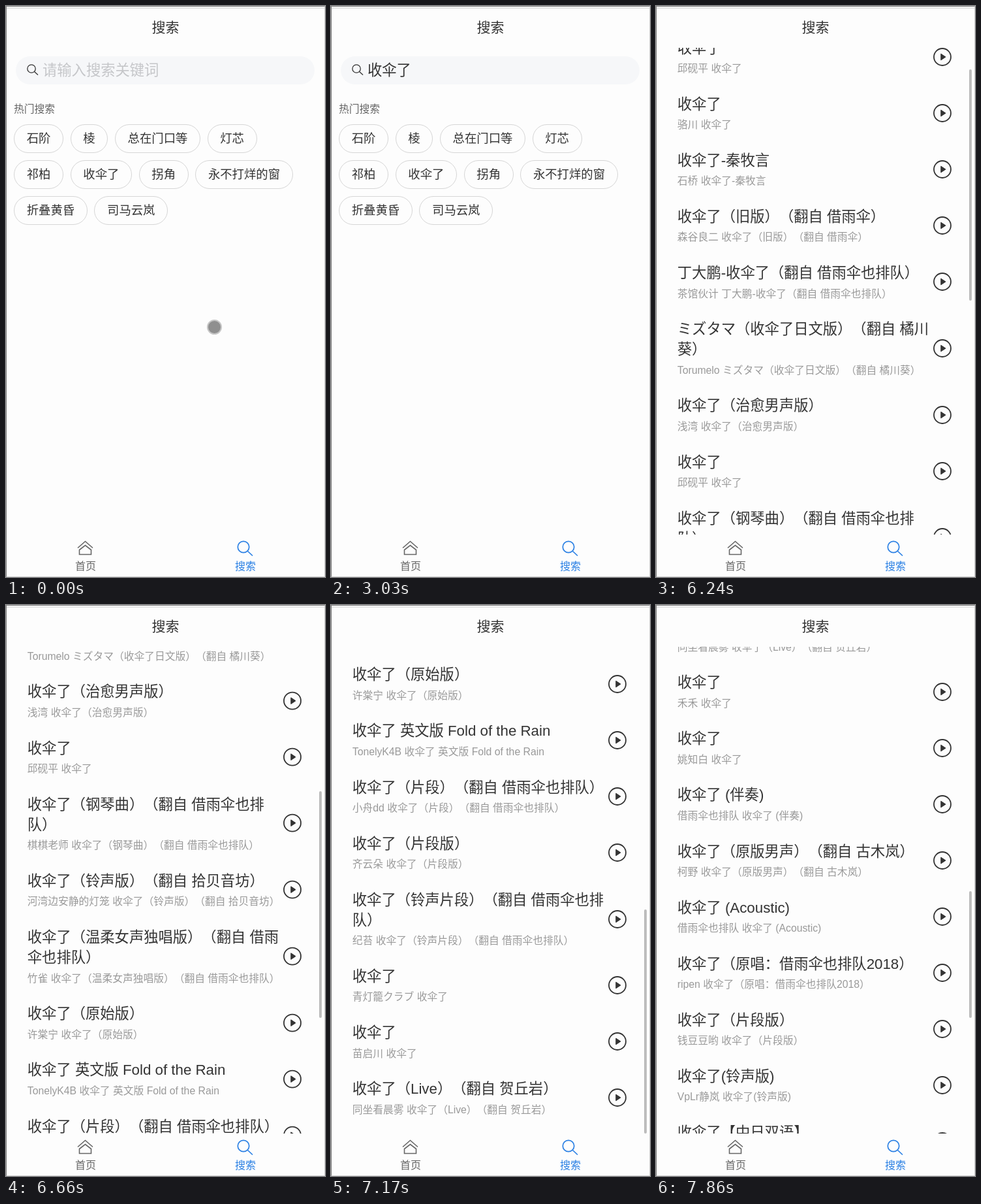
Animation of 489x874 px, one loop 8 s. Source, as an HTML page:

```html
<!DOCTYPE html>
<html lang="zh-CN">
<head>
<meta charset="utf-8">
<title>搜索</title>
<style>
html, body { margin: 0; width: 100%; height: 100%; overflow: hidden; }
body {
  position: relative; background: #fdfdfd; color: #333;
  font: 350 22.3px "Liberation Sans", "Noto Sans CJK SC", "Noto Sans CJK", sans-serif;
  text-spacing-trim: space-all;
}
body *, body::after { position: absolute; box-sizing: border-box; }
body::after {
  content: ""; inset: 0; border: 1px solid #d8d8d8;
  border-top-color: #808080; border-left-color: #808080; box-shadow: inset 0 2px #f4f4f4, inset 0 3px #dedede;
}
.head { left: 0; width: 100%; top: 18px; text-align: center; font-size: 21px; line-height: 30px; }
#view { left: 0; right: 0; top: 64px; height: 745px; overflow: hidden; }
#page { left: 0; top: -64px; width: 100%; }
.box { left: 15px; top: 77px; width: 458px; height: 43px; border-radius: 22px; background: #f6f7f9; }
#query { left: 41px; line-height: 43px; white-space: nowrap; }
#query.empty { color: #c5c6c9; }
#label { left: 12px; top: 147px; color: #666; font-size: 15.75px; line-height: 22px; white-space: nowrap; }
#tags { left: 12px; top: 180.6px; width: 450px; display: flex; flex-wrap: wrap; gap: 11.1px 10.5px; }
#tags span {
  position: static; height: 44.1px; padding: 0 18.7px; border: 1px solid #d6d6d6;
  border-radius: 23px; font-size: 18.375px; line-height: 42.5px; white-space: nowrap;
}
#list { left: 0; top: 167.8px; width: 100%; }
#list > div { position: relative; padding: 13.8px 0 13.75px 32.8px; }
#list b, #list i { position: static; display: block; font-style: normal; }
#list b { width: 390px; font-weight: 350; line-height: 31.2px; }
#list i { margin-top: 5.25px; color: #999; font-size: 15.75px; line-height: 22.1px; white-space: nowrap; }
#list svg { left: 425px; top: calc(50% - 14px); }
#bar { left: 480px; width: 4px; border-radius: 2px; background: #bdbdbd; }
svg { fill: none; stroke: currentColor; overflow: visible; }
.nav { width: 60px; text-align: center; top: 846px; font-size: 16px; line-height: 23px; color: #666; }
.on { color: #2b80e4; }
#dot { width: 23px; height: 23px; border-radius: 50%; border: 2.5px solid #c6c6c6; background: #8f8f8f; }
</style>
</head>
<body>
<div class="head">搜索</div>
<div id="view">
  <div id="page">
    <div class="box">
      <svg width="43" height="43" stroke-width="1.3"><circle cx="24" cy="19" r="6.2"/><path d="M28.5 23.5l5.5 5"/></svg>
      <div id="query"></div>
    </div>
    <div id="label"></div>
    <div id="tags"></div>
    <div id="list"></div>
  </div>
</div>
<div id="bar"></div>
<svg class="nav" style="left:92px;top:815px" width="60" height="30" stroke-width="1.6"><path d="M18 14.5L29.500 4.500 41 14.500M20.500 17.500L29.500 10.500 38.500 17.500V24.500H20.500Z"/></svg>
<div class="nav" style="left:92px">首页</div>
<svg class="nav on" style="left:337px;top:815px" width="60" height="30" stroke-width="1.7"><circle cx="27" cy="13" r="8.700"/><path d="M33.500 19.500L41 26.500"/></svg>
<div class="nav on" style="left:337px">搜索</div>
<div id="dot"></div>

<script>
const $ = id => document.getElementById(id);
const song = '收伞了', band = '借雨伞也排队', cover = `（翻自 ${band}）`;

$('tags').innerHTML = ['石阶', '棱', '总在门口等', '灯芯', '祁柏', song, '拐角', '永不打烊的窗', '折叠黄昏', '司马云岚']
  .map(s => `<span>${s}</span>`).join('');

// [singer, title]; a title starting with ~ continues the song name
const songs = [
  [band, '~'], ['邱砚平', '~'], ['骆川', '~'], ['石桥', '~-秦牧言'],
  ['森谷良二', '~（旧版）（翻自 借雨伞）'], ['茶馆伙计', `丁大鹏-${song}${cover}`],
  ['Torumelo', `ミズタマ（${song}日文版）（翻自 橘川葵）`], ['浅湾', '~（治愈男声版）'],
  ['邱砚平', '~'], ['棋棋老师', '~（钢琴曲）' + cover],
  ['河湾边安静的灯笼', '~（铃声版）（翻自 拾贝音坊）'], ['竹雀', '~（温柔女声独唱版）' + cover],
  ['许棠宁', '~（原始版）'], ['TonelyK4B', '~ 英文版 Fold of the Rain'],
  ['小舟dd', '~（片段）' + cover], ['齐云朵', '~（片段版）'], ['纪苔', '~（铃声片段）' + cover],
  ['青灯籠クラブ', '~'], ['苗启川', '~'], ['同坐看晨雾', '~（Live）（翻自 贺丘岩）'],
  ['禾禾', '~'], ['姚知白', '~'], [band, '~ (伴奏)'], ['柯野', '~（原版男声）（翻自 古木岚）'],
  [band, '~ (Acoustic)'], ['ripen', `~（原唱：${band}2018）`], ['钱豆豆哟', '~（片段版）'],
  ['VpLr静岚', '~(铃声版)'], ['浅湾', '~【中日双语】']
];
const play = '<svg width="28" height="28"><circle cx="14" cy="14" r="13" stroke-width="1.8"/>' +
  '<path d="M11.8 9.2L19 14l-7.2 4.800z" fill="currentColor" stroke-linejoin="round"/></svg>';
$('list').innerHTML = songs.map(([singer, name]) => {
  const title = name.replace('~', song);
  return `<div><b>${title}</b><i>${singer} ${title}</i>${play}</div>`;
}).join('');

// touches: from, to, x, y
const taps = [
  [0, 880, 319.5, 491], [1180, 1300, 142.5, 298], [1760, 1880, 142.5, 265],
  [2910, 3030, 142.5, 265], [3870, 3990, 109.5, 88], [6930, 7050, 274.5, 619]
];
// the list moves in steps at these times
const steps = [6240, 6390, 6510, 6660, 6810, 6930, 7050, 7170, 7320, 7470, 7590, 7740, 7860];
// time, scroll offset, thumb top, thumb height
const keys = [
  [6240, 219, 97, 354], [6930, 1006.5, 406, 343], [7170, 1217, 466, 343],
  [7320, 1349, 310, 194], [7470, 1481, 339, 194], [7860, 1925, 438, 194]
];

function scrollAt(t) {
  const s = steps.findLast(x => x <= t);
  if (!s) return [0, 0, 0, 0];
  const i = Math.min(keys.findLastIndex(k => k[0] <= s), keys.length - 2);
  const a = keys[i], b = keys[i + 1], u = (s - a[0]) / (b[0] - a[0]);
  return a.map((v, j) => v + (b[j] - v) * u);
}

function draw(t) {
  const typed = t >= 3030, found = t >= 3450;
  $('query').textContent = typed ? song : '请输入搜索关键词';
  $('query').className = typed ? '' : 'empty';
  $('label').textContent = found ? '最佳匹配' : '热门搜索';
  $('tags').style.display = found ? 'none' : 'flex';
  $('list').style.display = found ? 'block' : 'none';

  const [, y, top, height] = scrollAt(t);
  $('page').style.transform = `translateY(${-y}px)`;
  Object.assign($('bar').style, { top: top + 'px', height: height + 'px' });

  const tap = taps.find(([from, to]) => t >= from && t < to);
  $('dot').style.display = tap ? 'block' : 'none';
  if (tap) Object.assign($('dot').style, { left: tap[2] - 11.5 + 'px', top: tap[3] - 11.5 + 'px' });
}

function tick() {
  draw(performance.now() % 8000);
  requestAnimationFrame(tick);
}
tick();
</script>
</body>
</html>
```
